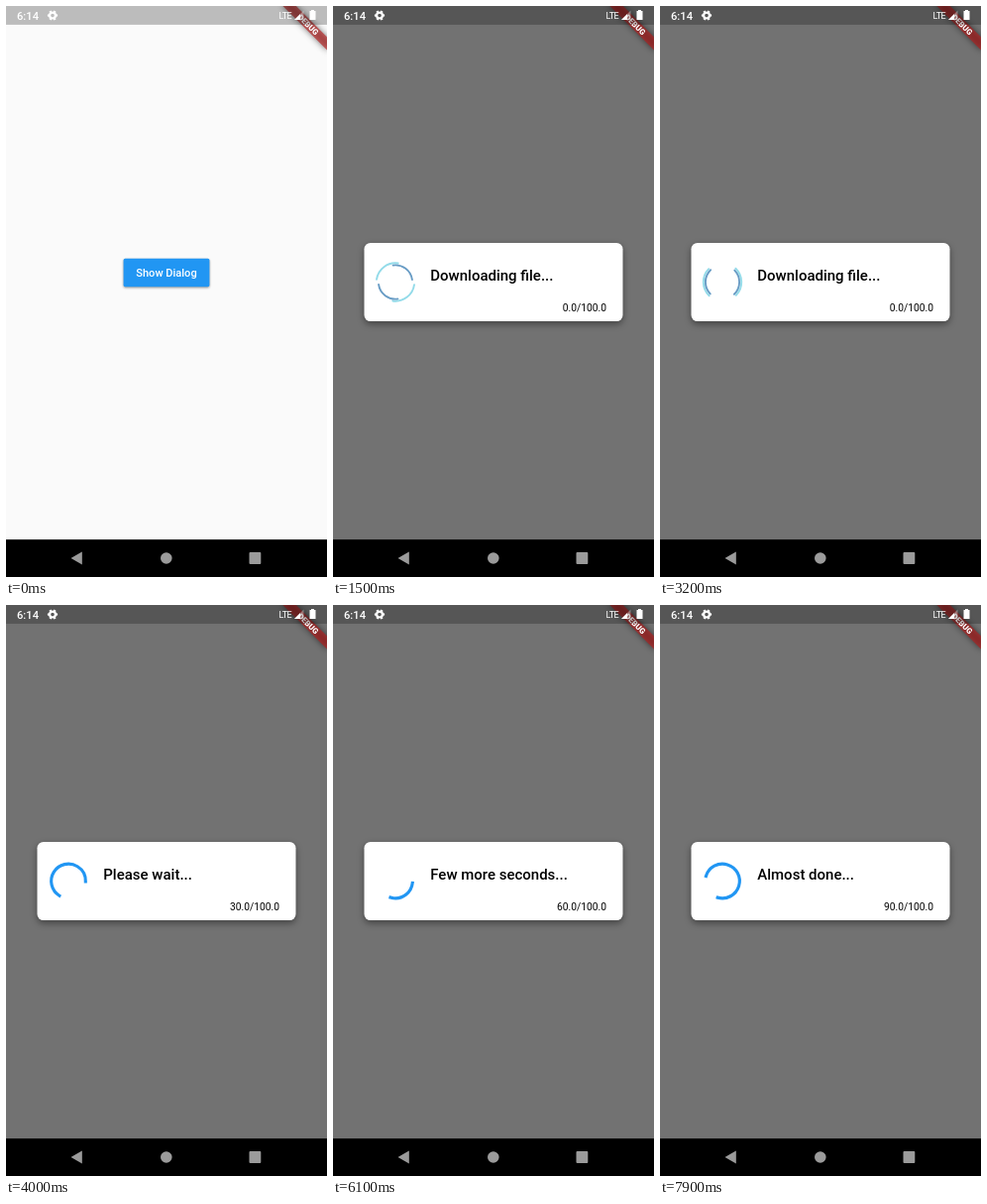
An HTML page that plays this animation: 324x576 px, repeating every 8 s.

```html
<!DOCTYPE html>
<html lang="en">
<head>
<meta charset="utf-8">
<title>Progress dialog</title>
<style>
  html, body { margin: 0; width: 100%; height: 100%; overflow: hidden; background: #fafafa; }
  svg { display: block; width: 324px; height: 576px; font-family: Roboto, sans-serif; }
  .medium { font-weight: 500; }
  .white { fill: #fff; }
  .ring { fill: none; stroke-width: 1.9; stroke-linecap: round; stroke-dasharray: 1; }
  #button rect { filter: drop-shadow(0 1.2px 1px rgba(0, 0, 0, .4)); }
  #panel { filter: drop-shadow(0 3px 3.5px rgba(0, 0, 0, .4)); }
</style>
</head>
<body>
<svg viewBox="0 0 324 576">
  <defs>
    <filter id="blur" x="-50%" y="-200%" width="200%" height="500%">
      <feGaussianBlur stdDeviation="3.1"/>
    </filter>
  </defs>
  <rect width="324" height="576" fill="#fafafa"/>

  <g id="button">
    <rect x="118.6" y="254.8" width="86.8" height="28.4" rx="1.6" fill="#2196f3"/>
    <text class="medium white" x="162" y="273" font-size="11.03" text-anchor="middle">Show Dialog</text>
  </g>

  <g id="dialog">
    <rect width="324" height="576" fill="#000" opacity=".54"/>
    <rect id="panel" x="31.5" y="239" width="261" height="79" rx="6.3" fill="#fff"/>
    <text id="message" class="medium" x="98.3" y="277" font-size="14.97"/>
    <text id="count" x="276" y="307.5" font-size="10.24" text-anchor="end"/>
    <g transform="translate(63 278.5)">
      <g id="rings">
        <circle id="outer" class="ring" r="19.2" pathLength="4" stroke="#93dbe9"/>
        <circle id="inner" class="ring" r="17.1" pathLength="4" stroke="#689cc5"/>
      </g>
      <circle id="spinner" r="17.33" pathLength="360" fill="none" stroke="#2196f3"
              stroke-width="3.15" stroke-linecap="square"/>
    </g>
  </g>

  <g transform="translate(324 0) rotate(45)">
    <rect x="-31.5" y="22.06" width="63" height="9.46" opacity=".5" filter="url(#blur)"/>
    <rect x="-31.5" y="22.06" width="63" height="9.46" fill="#b71c1c" opacity=".627"/>
    <text class="white" y="29.6" font-size="8" font-weight="900" text-anchor="middle">DEBUG</text>
  </g>

  <!-- status bar -->
  <rect width="324" height="18.9" opacity=".25"/>
  <text class="medium white" x="11" y="13.6" font-size="11.2">6:14</text>
  <g transform="translate(47 9.5)" fill="none" stroke="#fff">
    <circle r="2.9" stroke-width="2.2"/>
    <circle r="4.3" stroke-width="1.7" pathLength="12" stroke-dasharray="1" transform="rotate(-15)"/>
  </g>
  <text class="white" x="275.5" y="12.6" font-size="9" letter-spacing="-.5">LTE</text>
  <path class="white" d="M291 14L300.5 4.5V14Z" opacity=".35"/>
  <path class="white" d="M291 14L297 8V14Z"/>
  <path class="white" d="M308 4h3v1h1.5v9h-6v-9h1.5z"/>

  <!-- navigation bar -->
  <rect y="538.2" width="324" height="37.8"/>
  <g fill="#9b9b9b">
    <path d="M65.5 557L76.8 550.5V563.5Z"/>
    <circle cx="161.8" cy="557" r="5.8"/>
    <rect x="245.5" y="551" width="11.8" height="12" rx="1"/>
  </g>
</svg>
<script>
  const LOOP = 8000, STEP = 100;
  const OPEN = 1500, STAGE = 2000;
  const RINGS_START = 1455, SPINNER_START = 3433;
  const messages = ['Downloading file...', 'Please wait...', 'Few more seconds...', 'Almost done...'];
  const el = id => document.getElementById(id);
  const show = (id, on) => el(id).setAttribute('display', on ? 'inline' : 'none');
  const rotate = (id, deg) => el(id).setAttribute('transform', `rotate(${deg})`);

  // cubic-bezier(.4, 0, .2, 1)
  function ease(x) {
    if (x <= 0) return 0;
    if (x >= 1) return 1;
    let lo = 0, hi = 1, s;
    for (let i = 0; i < 24; i++) {
      s = (lo + hi) / 2;
      const bx = 1.2 * s * (1 - s) ** 2 + .6 * s * s * (1 - s) + s ** 3;
      if (bx < x) lo = s; else hi = s;
    }
    return s * s * (3 - 2 * s);
  }

  // Quarter arcs turning in opposite directions, once per two seconds.
  function drawRings(t) {
    const turn = 180 * (t - RINGS_START) / 1000;
    rotate('outer', turn);
    rotate('inner', -90 - turn);
  }

  // Head grows in the first half of each second, tail catches up in the second.
  function drawSpinner(t) {
    const drift = .04 * Math.sin(Math.PI * (t - 4900) / 3000) ** 2;
    const cycles = (t - SPINNER_START) / 1000 + drift;
    const step = Math.floor(cycles), p = cycles - step;
    const head = ease(p * 2), tail = ease(p * 2 - 1);
    rotate('spinner', -90 + tail * 270 + p * 306 - step * 144);
    el('spinner').setAttribute('stroke-dasharray', `${Math.max((head - tail) * 270, .06)} 360`);
  }

  function draw(t) {
    const open = t >= OPEN;
    show('button', !open);
    show('dialog', open);
    if (!open) return;
    const stage = Math.floor((t - OPEN) / STAGE);
    el('message').textContent = messages[stage];
    el('count').textContent = `${(stage * 30).toFixed(1)}/100.0`;
    show('rings', stage === 0);
    show('spinner', stage > 0);
    if (stage) drawSpinner(t); else drawRings(t);
  }

  const start = performance.now();
  function tick() {
    const t = (performance.now() - start) % LOOP;
    draw(Math.floor(t / STEP) * STEP);
    requestAnimationFrame(tick);
  }
  tick();
</script>
</body>
</html>
```
